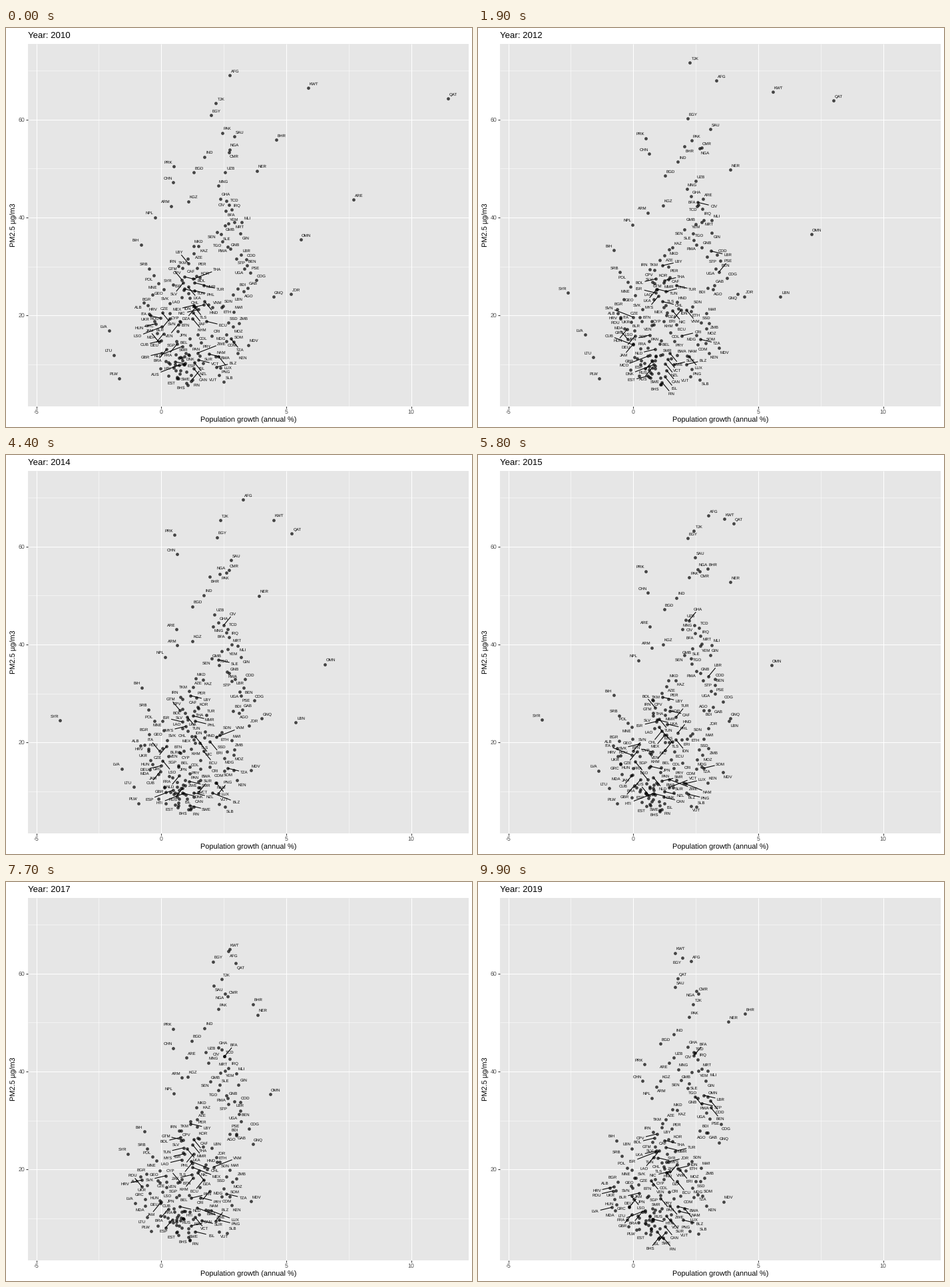
These frames come from a looping animation (700 by 600 pixels, 10 s). A matplotlib script:

```python
import numpy as np
import matplotlib.pyplot as plt
from matplotlib.animation import FuncAnimation
from matplotlib.collections import LineCollection
from matplotlib.patches import Rectangle

plt.rcParams["font.family"] = "Liberation Sans"
plt.rcParams["text.hinting"] = "none"

FRAMES, STEPS = 100, 11      # eleven steps per year
PT = 0.72                    # points per pixel at 100 dpi
CENTRE = 268                 # middle of the crowd
L, R, T, B = 33, 694.5, 23.5, 568.5

rng = np.random.default_rng(7)
years = np.arange(FRAMES) / STEPS
codes, paths = [], []


def add(code, at, xs, ys):
    codes.append(code)
    paths.append(np.stack([np.interp(years, at, xs), np.interp(years, at, ys)], 1))


def hero(code, *points):
    """A country that stands out, led through a few points."""
    xs, ys = zip(*points)
    add(code, (0, 1.727, 3.09, 5.273, 9), xs, ys)


def strip(names, first, last, spread):
    """Countries strung between two ends, each (x0, y0, x1, y1) over the decade."""
    names = names.split()
    first, last = np.array(first), np.array(last)
    at = np.arange(10)
    for u, code in zip(np.linspace(0, 1, len(names)), names):
        x0, y0, x1, y1 = first + (last - first) * u
        shift = np.clip(rng.normal(0, 1, 2), -1.7, 1.7) * (spread, 4)
        wobble = rng.normal(0, 2, (2, 10))
        add(code, at, np.linspace(x0, x1, 10) + shift[0] + wobble[0],
            np.linspace(y0, y1, 10) + shift[1] + wobble[1])


hero("AFG", (336, 71), (358, 79), (364, 50), (346, 91), (320, 119))
hero("KWT", (454, 90), (443, 96), (425, 99), (370, 96), (296, 107))
hero("QAT", (664, 106), (534, 109), (462, 129), (384, 103), (300, 145))
hero("TJK", (315, 113), (318, 52), (320, 87), (324, 114), (323, 184))
hero("EGY", (308, 131), (315, 136), (318, 123), (315, 125), (307, 114))
hero("SAU", (343, 163), (349, 152), (346, 161), (326, 154), (296, 158))
hero("BHR", (406, 168), (310, 178), (278, 192), (345, 171), (401, 198))
hero("NER", (377, 215), (379, 213), (380, 227), (379, 191), (376, 210))
hero("PRK", (252, 208), (252, 166), (253, 81), (252, 175), (250, 274))
hero("CHN", (251, 232), (257, 189), (258, 108), (255, 207), (247, 299))
hero("ARE", (522, 258), (338, 257), (255, 265), (258, 258), (287, 272))
hero("OMN", (443, 318), (501, 310), (507, 314), (441, 316), (345, 323))
hero("SYR", (251, 386), (135, 398), (71, 400), (96, 398), (283, 421))
hero("LBN", (341, 401), (454, 404), (477, 404), (377, 400), (231, 401))

strip("JOR GNQ", (429, 399, 285, 420), (404, 401, 366, 391), 2)
strip("PAK IND BGD", (316, 164, 309, 210), (276, 215, 272, 241), 5)
strip("CMR NGA", (336, 185, 331, 164), (333, 190, 329, 170), 1)
strip("UZB MNG KGZ ARM NPL", (335, 222, 298, 268), (225, 287, 262, 324), 8)
strip("GHA TCD CIV BFA IRQ MRT YEM MLI GMB SEN GIN SLE TGO GNB RWA",
      (336, 254, 326, 245), (334, 336, 328, 328), 12)
strip("LBR STP COD BEN UGA PSE COG BDI GAB AGO",
      (344, 338, 332, 322), (361, 401, 346, 383), 14)
strip("ETH SDN MWI SSD ZMB MOZ MDG TZA SOM COM KEN",
      (335, 414, 328, 418), (334, 489, 328, 487), 8)
strip("MKD KAZ TKM AZE PER LBY IRN CPV KOR CAF MMR SLV",
      (266, 330, 276, 348), (268, 384, 266, 398), 17)
strip("BIH", (202, 322, 207, 387), (202, 322, 207, 387), 0)
strip("SRB POL MNE GEO BGR ALB HRV UKR ROU GRC HUN MDA",
      (222, 363, 222, 420), (222, 458, 203, 488), 9)
strip("LVA LTU PLW", (155, 458, 205, 490), (164, 527, 235, 523), 2)
strip("BOL GTM THA TUN LKA TUR ISR PHL LAO MYS HND TLS CHL IDN VNM MEX ERI NIC DZA BTN",
      (280, 375, 280, 388), (284, 432, 284, 446), 17)
strip("ZAF KHM ECU VEN CYP CRI COL PRY SGP BEL PAN BWA ZWE SMR",
      (283, 432, 284, 440), (285, 495, 284, 494), 16)
strip("SVK CZE SVN BLR ITA LSO DEU JPN JAM CUB FRA NLD BRA GBR RUS ESP DNK",
      (242, 421, 236, 452), (248, 506, 247, 514), 11)
strip("MDV", (362, 481, 370, 484), (362, 481, 370, 484), 0)
strip("MCO VCT SUR HTI NZL AUS CAN SWE EST ISL FIN BHS",
      (270, 492, 265, 497), (266, 538, 264, 540), 18)
strip("NAM LUX BLZ PNG VUT SLB", (315, 492, 304, 492), (325, 525, 326, 524), 6)

named = len(codes)
strip(" - " * 22, (260, 488, 258, 494), (262, 530, 262, 531), 18)  # no label
places = np.stack(paths, 1)

# Label offsets, nearest first; x counts outward from the crowd
OFFSETS = [(8, -6.5), (8, 6.5), (-8, 6.5), (-8, -6.5), (14, -17), (25, 6), (25, -6),
           (14, 17), (-14, -17), (-25, 6), (-14, 17), (36, -14), (36, 14)]


def layout(i):
    """Label centres by country, each in its first free spot."""
    dots = places[i]
    taken = np.full((1, 2), -99.0)
    spots = {}
    for k in range(named):
        side = 1 if dots[k, 0] > CENTRE else -1
        for dx, dy in OFFSETS:
            c = dots[k] + (dx * side, dy)
            on_text = (np.abs(taken - c) < (14, 6)).all(1).any()
            on_dot = (np.abs(dots - c) < (8, 4)).all(1).any()
            if not on_text and not on_dot and c[1] < 556:
                spots[k] = c
                taken = np.vstack([taken, c])
                break
    return spots


def px(v):
    return 233.2 + 37.53 * v


def py(v):
    return 579.5 - 7.365 * v


fig = plt.figure(figsize=(7, 6), dpi=100, facecolor="white")
ax = fig.add_axes([0, 0, 1, 1])
ax.set(xlim=(0, 700), ylim=(600, 0))
ax.axis("off")
ax.add_patch(Rectangle((L, T), R - L, B - T, fc="#E6E6E6", lw=0, zorder=0))


def line(xs, ys, width, color="white"):
    ax.plot(xs, ys, color=color, lw=width * PT, zorder=1, solid_capstyle="butt")


def write(x, y, s, size, **kw):
    return ax.text(x, y, s, fontsize=size * PT, **kw)


for v in (-2.5, 2.5, 7.5):
    line([px(v)] * 2, [T, B], 0.55)
for v in (10, 30, 50, 70):
    line([L, R], [py(v)] * 2, 0.55)
for v in (-5, 0, 5, 10):
    line([px(v)] * 2, [T, B], 1.07)
    line([px(v)] * 2, [B, B + 3], 1.07, "#333333")
    write(px(v), 580, str(v), 8.8, ha="center", color="#4D4D4D")
for v in (20, 40, 60):
    line([L, R], [py(v)] * 2, 1.07)
    line([L - 3, L], [py(v)] * 2, 1.07, "#333333")
    write(28.5, py(v) + 3.2, str(v), 8.8, ha="right", color="#4D4D4D")
write((L + R) / 2, 593, "Population growth (annual %)", 11, ha="center")
write(17, (T + B) / 2, "PM2.5 µg/m3", 11, rotation=90, ha="right", va="center")
title = write(L, 15, "", 13.2)

dots = ax.scatter(*places[0].T, s=(4.8 * PT) ** 2, color="black", alpha=0.7, lw=0, zorder=3)
leaders = LineCollection([], colors="black", linewidths=1.07 * PT, zorder=4)
ax.add_collection(leaders, autolim=False)
labels = [write(0, 0, c, 6.1, ha="center", zorder=5) for c in codes[:named]]


def draw(i):
    title.set_text(f"Year: {round(2010 + years[i])}")
    dots.set_offsets(places[i])
    spots = layout(i)
    segs = []
    for k, label in enumerate(labels):
        label.set_visible(k in spots)
        if k not in spots:
            continue
        c = spots[k]
        label.set_position((c[0], c[1] + 2))
        d = places[i, k] - c
        if np.hypot(*d) > 14:
            segs.append((places[i, k], c + d * min(8 / abs(d[0]), 4 / abs(d[1]))))
    leaders.set_segments(segs)
    return [title, dots, leaders, *labels]


anim = FuncAnimation(fig, draw, frames=FRAMES, interval=100, repeat=True, repeat_delay=0)
plt.show()
```
